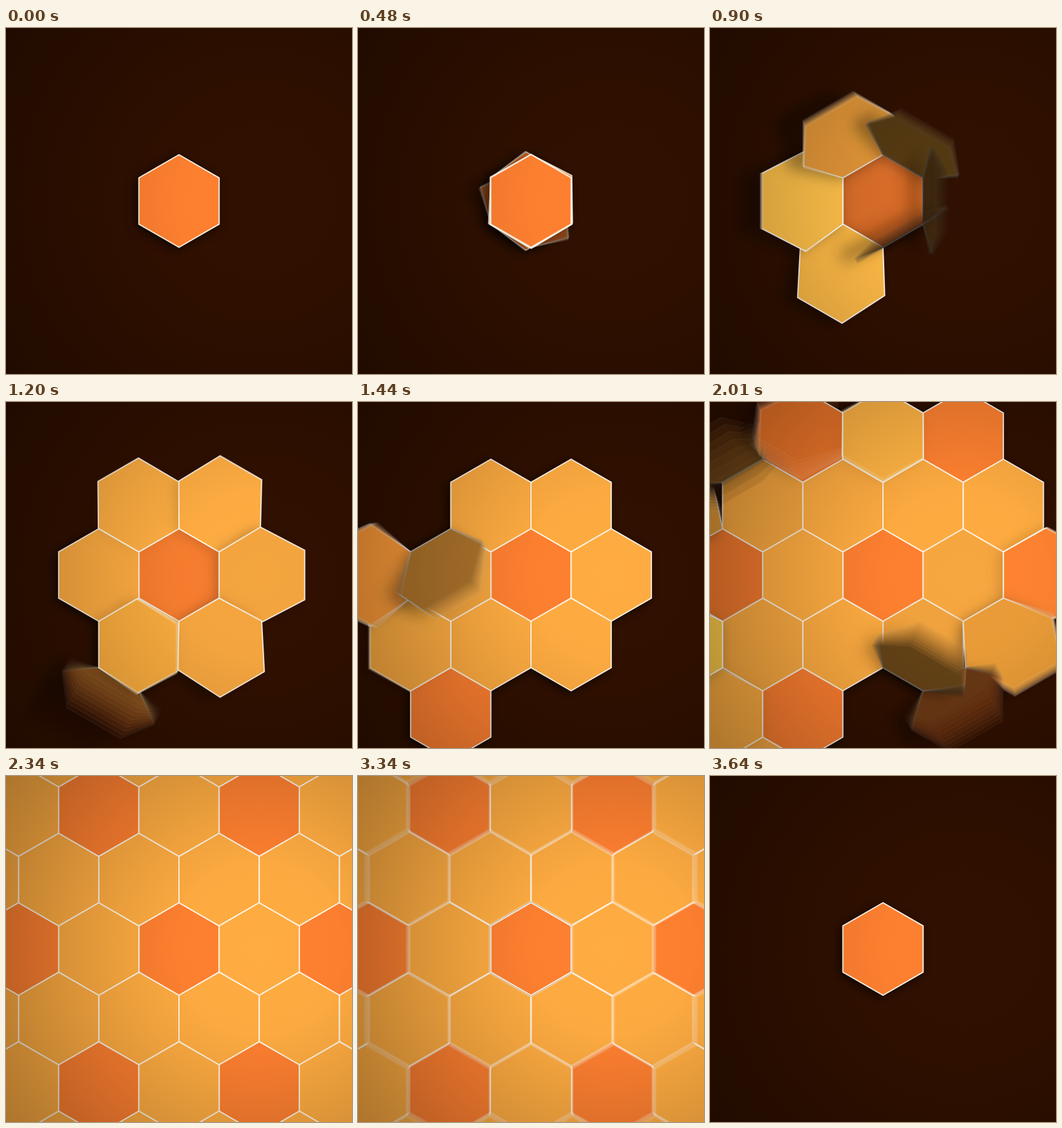
An HTML page with a canvas that plays this animation: 540x540 px, repeating every 4640 ms.

```html
<!DOCTYPE html>
<html>
<head>
<meta charset="utf-8">
<style>
  html, body { margin: 0; width: 100%; height: 100%; overflow: hidden; background: #210b00; }
  canvas { display: block; }
</style>
</head>
<body>
<canvas id="stage" width="540" height="540"></canvas>
<script>
const SIZE = 540, LOOP = 4640, STEP = 30;
const BUILT = 2340, BURST = 3340, CLEARED = 3640;
const RADIUS = 72.3, PITCH = RADIUS * Math.sqrt(3), CAMERA = 500;
const LAMP = { x: 125, y: 0, z: 450 };
const ORANGE = [255, 128, 48], YELLOW = [255, 172, 65], WHITE = [255, 245, 230];
const BLUR_SAMPLES = 10;

const screen = document.getElementById('stage').getContext('2d');
const layer = document.createElement('canvas');
layer.width = layer.height = SIZE;
const ctx = layer.getContext('2d');

const polar = (r, deg) => {
  const a = deg * Math.PI / 180;
  return { x: r * Math.cos(a), y: r * Math.sin(a) };
};
const CORNERS = Array.from({ length: 6 }, (_, i) => polar(RADIUS, 60 * i - 90));

// Start time and duration of the flip of the k-th tile in a ring.
function flipTiming(ring, k) {
  if (ring === 1) return { start: 148 + 80 * k - 4.2 * k * k, span: 980 };
  if (ring === 2) return { start: 1055 + 100 * Math.min(k, 6) + 50 * Math.max(k - 6, 0), span: 300 };
  return { start: 1840 + 20 * k, span: 160 };
}

// Rings run clockwise from the lower left; each tile hinges on one of the ring inside it.
function buildTiles() {
  const rings = [[{ x: 0, y: 0, color: ORANGE, parent: null }]];
  for (let ring = 1; ring <= 3; ring++) {
    rings[ring] = [];
    for (let k = 0; k < 6 * ring; k++) {
      const side = Math.floor(k / ring), along = k % ring;
      const out = polar(PITCH * ring, 120 + 60 * side);
      const edge = polar(PITCH * along, 240 + 60 * side);
      rings[ring].push({
        x: out.x + edge.x,
        y: out.y + edge.y,
        color: ring === 2 && k % 2 === 0 ? ORANGE : YELLOW,
        parent: rings[ring - 1][Math.floor(k * (ring - 1) / ring)],
        ...flipTiming(ring, k)
      });
    }
  }
  return rings.flat();
}
const tiles = buildTiles();

const shade = (rgb, b) => `rgb(${rgb.map(c => Math.round(c * b)).join(',')})`;

function angleAt(tile, t) {
  if (!tile.parent) return 0;
  const u = Math.min(1, (t - tile.start) / tile.span);
  return u < 0 ? null : Math.PI / 2 * (1 + Math.cos(Math.PI * u));
}

// A tile turned about its hinge: its corners in space, its middle and its normal.
function fold(tile, angle) {
  const p = tile.parent;
  const mx = (tile.x + p.x) / 2, my = (tile.y + p.y) / 2;
  const nx = (tile.x - p.x) / PITCH, ny = (tile.y - p.y) / PITCH;
  const cos = Math.cos(angle), sin = Math.sin(angle);
  const place = (x, y) => {
    const reach = (x - mx) * nx + (y - my) * ny, side = (y - my) * nx - (x - mx) * ny;
    return {
      x: mx + reach * cos * nx - side * ny,
      y: my + reach * cos * ny + side * nx,
      z: reach * sin
    };
  };
  return {
    corners: CORNERS.map(c => place(tile.x + c.x, tile.y + c.y)),
    middle: place(tile.x, tile.y),
    normal: { x: -nx * sin, y: -ny * sin, z: cos }
  };
}

function project(p) {
  const zoom = CAMERA / (CAMERA - p.z);
  return { x: p.x * zoom, y: p.y * zoom };
}

// Where the lamp throws a raised point onto the ground.
function toGround(p) {
  const k = p.z / (LAMP.z - p.z);
  return { x: p.x + (p.x - LAMP.x) * k, y: p.y + (p.y - LAMP.y) * k };
}

function lampOn(point, normal) {
  const x = LAMP.x - point.x, y = LAMP.y - point.y, z = LAMP.z - point.z;
  return Math.abs(x * normal.x + y * normal.y + z * normal.z) / Math.hypot(x, y, z);
}

function flatOutline(tile, spread = 1, size = 1) {
  return CORNERS.map(c => ({ x: tile.x * spread + c.x * size, y: tile.y * spread + c.y * size }));
}

function trace(points) {
  points.forEach((p, i) => i ? ctx.lineTo(p.x, p.y) : ctx.moveTo(p.x, p.y));
  ctx.closePath();
}

function castShadow(outlines, alpha, blur) {
  ctx.save();
  ctx.shadowColor = `rgba(0,0,0,${alpha})`;
  ctx.shadowBlur = blur;
  // Only the shadow lands on the stage; the caster stays outside it.
  ctx.shadowOffsetX = 2 * SIZE - 4;
  ctx.shadowOffsetY = 3;
  ctx.translate(-2 * SIZE, 0);
  ctx.beginPath();
  outlines.forEach(trace);
  ctx.fill();
  ctx.restore();
}

function drawTile(outline, color, light) {
  ctx.beginPath();
  trace(outline);
  ctx.fillStyle = shade(color, light);
  ctx.fill();
  ctx.strokeStyle = shade(WHITE, light);
  ctx.lineWidth = 1.9;
  ctx.stroke();
}

function drawFlip(tile, angle) {
  const { corners, middle, normal } = fold(tile, angle);
  castShadow([corners.map(toGround)], 0.32 * Math.min(1, 3 * Math.sin(angle)), 20);
  const upright = { x: 0, y: 0, z: 1 };
  const light = Math.max(0.24, lampOn(middle, normal) / lampOn(tile, { ...upright }));
  const color = normal.z < 0 ? tile.parent.color : tile.color;
  drawTile(corners.map(project), color, light);
}

function drawBuild(t) {
  const active = tiles.map(tile => ({ tile, angle: angleAt(tile, t) }))
    .filter(a => a.angle !== null);
  const landed = active.filter(a => a.angle < 0.005);
  castShadow(landed.map(a => flatOutline(a.tile)), 0.75, 16);

  // Raised tiles keep some light off the one they hinge on.
  const dimming = new Map();
  for (const { tile, angle } of active) {
    dimming.set(tile.parent, (dimming.get(tile.parent) || 0) + 0.03 * Math.sin(angle));
  }
  for (const { tile, angle } of active) {
    if (angle < 0.005) drawTile(flatOutline(tile), tile.color, 1 - (dimming.get(tile) || 0));
    else drawFlip(tile, angle);
  }
}

function drawBurst(t) {
  const rush = Math.pow((t - BURST + STEP) / (CLEARED - BURST + STEP), 2.5);
  const outlines = tiles.map(tile => tile.parent
    ? flatOutline(tile, 1 + 6.5 * rush, 1 + 4.5 * rush)
    : flatOutline(tile));
  castShadow(outlines, 0.75, 16);
  outlines.forEach((outline, i) => drawTile(outline, tiles[i].color, 1));
}

function drawLight() {
  const g = ctx.createRadialGradient(395, 270, 0, 395, 270, 520);
  [[0, 0], [0.25, 0.01], [0.42, 0.08], [0.6, 0.16], [0.75, 0.24], [1, 0.36]]
    .forEach(([at, a]) => g.addColorStop(at, `rgba(0,0,0,${a})`));
  ctx.fillStyle = g;
  ctx.fillRect(0, 0, SIZE, SIZE);
}

function drawScene(t, bursting) {
  ctx.fillStyle = '#301000';
  ctx.fillRect(0, 0, SIZE, SIZE);
  ctx.save();
  ctx.translate(SIZE / 2, SIZE / 2);
  ctx.lineJoin = 'round';
  if (bursting) drawBurst(t); else drawBuild(t);
  ctx.restore();
  drawLight();
}

function snap(t) {
  if (t < BUILT) return Math.floor(t / STEP) * STEP;
  if (t < BURST) return BUILT;
  if (t < CLEARED) return BURST + Math.floor((t - BURST) / STEP) * STEP;
  return 0;
}

tiles.forEach(tile => { tile.z = 0; });
let shown = -1;
function render(now) {
  requestAnimationFrame(render);
  const t = snap(now % LOOP);
  if (t === shown) return;
  shown = t;
  const moving = t > 0 && t !== BUILT;
  const samples = moving ? BLUR_SAMPLES : 1;
  for (let i = 0; i < samples; i++) {
    const offset = moving ? (i / (samples - 1) - 0.5) * 22 : 0;
    drawScene(t + offset, t >= BURST);
    screen.globalAlpha = 1 / (i + 1);
    screen.drawImage(layer, 0, 0);
  }
}
render(performance.now());
</script>
</body>
</html>
```
